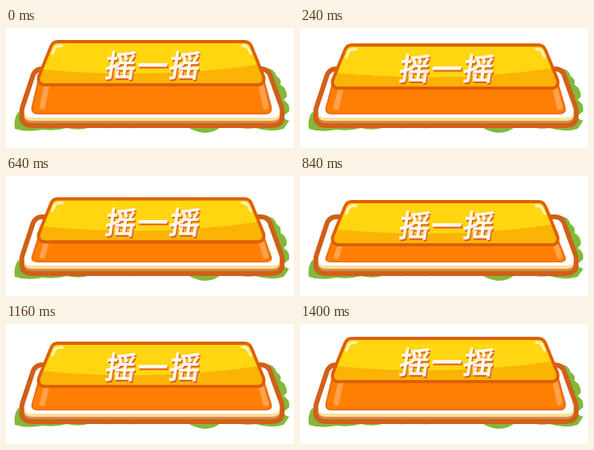
An HTML page that plays this animation: 360x150 px, repeating every 1600 ms.

```html
<!DOCTYPE html>
<html lang="zh">
<head>
<meta charset="utf-8">
<style>
  html, body { margin: 0; width: 100%; height: 100%; overflow: hidden; background: #fff; }
  svg { display: block; width: 360px; height: 150px; }
  text {
    font: 400 38px "Noto Sans CJK SC", "Noto Sans CJK", sans-serif;
    letter-spacing: 2px;
    stroke-width: 1.3px;
  }
  .edge { fill: #d15f18; stroke: #d15f18; stroke-width: 12px; }
</style>
</head>
<body>
<svg viewBox="0 0 360 150">
  <defs>
    <path id="rim" d="M46 54H318Q326 54 328 62L341 98Q346 112 332 112H33Q19 112 24 98L36 62Q38 54 46 54Z"/>
    <path id="top" d="M65 19H298Q303 19 305 24L320 61Q322 69 314 69H49Q41 69 43 61L58 24Q60 19 65 19Z"/>
    <clipPath id="face"><use href="#top"/></clipPath>
  </defs>

  <g fill="#82b83a">
    <path d="M16 104Q9 113 11 126Q26 131 46 127Q62 129 76 125Q92 129 106 124L100 116H20Z"/>
    <path d="M106 122Q122 127 140 124Q162 127 186 122Z"/>
    <path d="M224 122Q236 130 247 131Q262 131 270 122Z"/>
    <path d="M284 120Q294 128 312 125Q330 131 347 126L354 116L340 110Z"/>
    <path d="M322 50Q335 49 338 60Q345 64 343 71Q352 76 351 86L347 90Q355 94 354 104L347 110Z"/>
  </g>

  <use href="#rim" class="edge"/>
  <use href="#rim" class="edge" y="7"/>
  <use href="#rim" fill="#d78a48" y="7"/>
  <use href="#rim" fill="#f8e09a" y="4"/>
  <use href="#rim" fill="#fff"/>

  <g id="front">
    <path fill="#ff7f04" stroke="#ec6b10" stroke-width="2" d="M41 64H322L331 98Q333 107 324 107H40Q31 107 33 98Z"/>
    <path fill="#ffa14d" d="M48 70H55L48 102Q41 102 42 97ZM315 70H322L328 97Q329 102 322 102Z"/>
  </g>

  <g id="cap">
    <use href="#top" fill="none" stroke="#de6004" stroke-width="8"/>
    <g clip-path="url(#face)">
      <rect x="38" y="15" width="290" height="57" fill="#fbb306"/>
      <path fill="#ffd60f" d="M38 15H328V44Q190 66 38 51Z"/>
    </g>
    <g fill="none" stroke="#fff1b8" stroke-width="3.5" stroke-linecap="round">
      <path d="M58 32L61 25Q63 22 70 22"/>
      <path d="M295 22Q301 22 303 26L306 32"/>
    </g>
    <g transform="translate(121 61) skewX(-8)">
      <text x="3" y="1.5" fill="#dc5a24" stroke="#dc5a24">摇一摇</text>
      <text x="1.5" fill="#fff8ea" stroke="#fff8ea">摇一摇</text>
    </g>
  </g>
</svg>
<script>
  const cap = document.getElementById("cap");
  const front = document.getElementById("front");
  const STEP = 40, LOOP = 1600, LAST = 35, LOWEST = 21, DEPTH = 15;
  const FLOOR = 108, FRONT_HEIGHT = 44;

  // Slow press, quicker release, then a rest on the last step.
  function depthAt(ms) {
    const step = Math.min(LAST, Math.floor((ms % LOOP) / STEP));
    return step <= LOWEST ? DEPTH * step / LOWEST : DEPTH - (step - LOWEST);
  }

  // The cap slides down while the front is squashed against its floor.
  function draw() {
    const depth = depthAt(performance.now() - start);
    const squash = 1 - depth / FRONT_HEIGHT;
    cap.setAttribute("transform", `translate(0 ${depth})`);
    front.setAttribute("transform", `translate(0 ${FLOOR * (1 - squash)}) scale(1 ${squash})`);
    requestAnimationFrame(draw);
  }

  const start = performance.now();
  draw();
</script>
</body>
</html>
```
